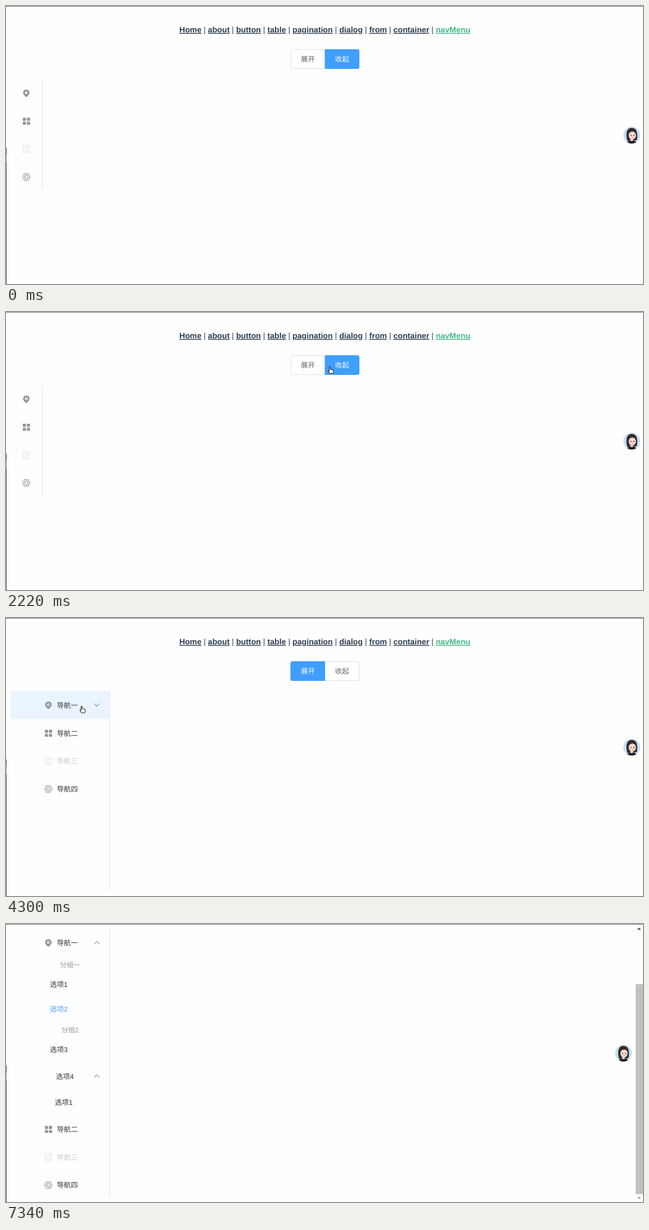
An HTML page for the animation above (7.59 s loop, 1132 px wide and 495 px high).

```html
<!DOCTYPE html>
<html lang="zh">
<head>
<meta charset="utf-8">
<title>navMenu</title>
<style>
html, body { margin: 0; width: 100%; height: 100%; overflow: hidden; background: #fefefe; }
svg { display: block; }
text { font: 12.4px 'Liberation Sans', 'Noto Sans CJK SC', 'Noto Sans CJK', sans-serif; fill: #303133; text-rendering: geometricPrecision; white-space: pre; }
.nav { font-size: 14.16px; fill: #2c3e50; text-anchor: middle; }
.nav tspan { font-weight: bold; text-decoration: underline; }
.nav .here { fill: #42b983; }
.group { font-size: 12px; fill: #909399; }
.btn { text-anchor: middle; }
.off { opacity: .25; }
.hover { fill: #eaf4ff; }
.line { fill: none; stroke: #909399; stroke-width: 1.1; stroke-linejoin: round; stroke-linecap: round; }
.cursor { fill: #fff; stroke: #222; stroke-width: 1.1; stroke-linejoin: round; }
</style>
</head>
<body>
<svg id="stage" width="1132" height="495" viewBox="0 0 1132 495">
  <defs><path id="chev" class="line" d="M-4.3 2.2L0-2.2L4.3 2.2"/></defs>
  <rect width="1132" height="495" fill="#fefefe"/>

  <g id="page">
    <g id="head">
      <text class="nav" x="566.5" y="47"><tspan>Home</tspan> | <tspan>about</tspan> | <tspan>button</tspan> | <tspan>table</tspan> | <tspan>pagination</tspan> | <tspan>dialog</tspan> | <tspan>from</tspan> | <tspan>container</tspan> | <tspan class="here">navMenu</tspan></text>
      <rect x="506" y="77.5" width="121.5" height="34" rx="3.5" fill="#fff" stroke="#dcdfe6"/>
      <path id="fillL" fill="#409eff" d="M567 77H509.5a4 4 0 0 0-4 4V108a4 4 0 0 0 4 4H567Z"/>
      <path id="fillR" fill="#409eff" d="M566.5 77H624a4 4 0 0 1 4 4V108a4 4 0 0 1-4 4H566.5Z"/>
      <text id="txtL" class="btn" x="536.4" y="99.2">展开</text>
      <text id="txtR" class="btn" x="597.2" y="99.2">收起</text>
    </g>

    <rect id="hov1" class="hover" x="8" y="130" width="176.5" height="49.6"/>
    <g id="row1">
      <path fill="#909399" fill-rule="evenodd" d="M75.2 162.4C72.4 159.6 69.6 157.4 69.6 154.4A5.7 5.7 0 0 1 81 154.4C81 157.4 78 159.6 75.2 162.4ZM75.2 151.9a2.6 2.6 0 1 0 .01 0ZM75.2 153.3a1.2 1.2 0 1 1-.01 0Z"/>
      <text class="label" x="90.4" y="159.8">导航一</text>
    </g>
    <g id="chev1"><use id="chev1r" href="#chev"/></g>

    <svg id="sub" x="0" y="180" width="184">
      <g transform="translate(0 -180)">
        <rect id="hov2" class="hover" x="8" y="251.7" width="176.5" height="44.3"/>
        <rect id="hov3" class="hover" x="8" y="323.7" width="176.5" height="44.3"/>
        <text class="group" x="96" y="198.4">分组一</text>
        <text x="78" y="234">选项1</text>
        <text id="opt2" x="78" y="278.2">选项2</text>
        <text class="group" x="98.4" y="314.6">分组2</text>
        <text id="opt3" x="78" y="350.2">选项3</text>
        <text x="88.8" y="397.8">选项4</text>
        <use href="#chev" x="161.5" y="392.5"/>
        <text id="opt41" x="86.8" y="444">选项1</text>
      </g>
    </svg>

    <g id="rest">
      <path fill="#909399" d="M69.2 199h5.4v5.4h-5.4zM76.4 199h5.4v5.4h-5.4zM69.2 206.2h5.4v5.4h-5.4zM76.4 206.2h5.4v5.4h-5.4z"/>
      <text class="label" x="90.4" y="209.6">导航二</text>
      <g class="off">
        <path class="line" d="M70 248.5H77.5L81 252V261.5H70ZM77.5 248.5V252H81M72.5 252.5H74.5M72.5 255.5H78.5M72.5 258.5H78.5"/>
        <text class="label" x="90.4" y="259">导航三</text>
      </g>
      <path id="gear" class="line"/>
      <circle class="line" cx="75.3" cy="304.4" r="2.9"/>
      <text class="label" x="90.4" y="308.6">导航四</text>
    </g>
    <rect id="edge" y="130" width="1" fill="#e6e6e6"/>
    <rect id="caret" width="1.2" height="14"/>
  </g>

  <g id="avatar">
    <circle cx="1112" cy="230" r="15" fill="#c4e0fb"/>
    <path fill="#3a2b2b" d="M1104 240C1101 229 1102 217 1112 217C1122 217 1123 229 1121 239Z"/>
    <path fill="#202024" d="M1104 242.5Q1106 239 1112 239Q1118 239 1120 242.5Q1112 247.5 1104 242.5Z"/>
    <path fill="#f6cfc0" d="M1109.5 236h5v3.5q-2.5 2.5-5 0z"/>
    <ellipse cx="1113" cy="230.5" rx="6.5" ry="7" fill="#fbdccf"/>
    <path fill="#3a2b2b" d="M1105.5 231Q1107 222 1114 221.5Q1119 223 1120 230Q1122 219 1112 217.5Q1103 219 1105.5 231Z"/>
    <circle cx="1110.4" cy="230.5" r="1.1" fill="#33262a"/><circle cx="1116" cy="230.5" r="1.1" fill="#33262a"/>
    <path d="M1112 234.6h2.6" stroke="#d0605c"/>
  </g>

  <g id="bar">
    <rect x="1118" y="1" width="14" height="494" fill="#fefefe"/>
    <rect id="patch" x="1119" y="417" width="13" height="43" fill="#f1f1f1"/>
    <rect id="thumb" x="1119" width="13" fill="#c1c1c1"/>
    <path id="up" d="M1121.5 10.2h7l-3.5-4z"/>
    <path id="down" d="M1121.5 486.2h7l-3.5 4z"/>
  </g>

  <rect width="1132" height="1" fill="#77777c"/>
  <rect y="252" width="1" height="243" fill="#4c4c50"/>
  <rect y="265" width="1" height="13" fill="#99999c"/>

  <path id="arrow" class="cursor" d="M-3.6-5.6V4.6Q-3.4 6-2.2 5.2L.2 3.2H3.6Q5 2.8 4 1.6L-2.4-5.6Q-3.2-6.4-3.6-5.6Z"/>
  <path id="hand" class="cursor" d="M-2.6 1V-5Q-1.6-6.8-.6-5V-1.4Q.6-2.2 1.4-1Q2.6-1.6 3.2-.4Q4.8-.8 4.8 1V3Q4.6 4.6 3.6 6H-1.6Q-3 3.6-4.6 1.6Q-4.6 0-2.6 1Z"/>
</svg>

<script>
const LOOP = 7590, SUB = 282.2, MAX_SCROLL = 121.7;
const BLUE = '#409eff', DARK = '#303133', GREY = '#606266';
const $ = id => document.getElementById(id);
const set = (id, attrs) => { for (const k in attrs) $(id).setAttribute(k, attrs[k]); };
const show = (id, on) => set(id, { opacity: +on });
const move = (id, x, y) => set(id, { transform: `translate(${x} ${y})` });
const ramp = (t, a, b) => Math.min(1, Math.max(0, (t - a) / (b - a)));
const ease = (t, a, b) => { const p = ramp(t, a, b); return p * p * (3 - 2 * p); };
const within = (t, ...spans) => spans.some(([a, b]) => t >= a && t < b);

// time, x, y
const path = [
  [160, 710, 44], [810, 541, 105], [1250, 541, 105], [1700, 607, 105], [2050, 607, 105],
  [2400, 545, 102], [2520, 545, 102], [2880, 208.5, 160], [3130, 150, 165], [3470, 150, 165],
  [3700, 136, 163], [4640, 136, 163], [4870, 150, 183], [5010, 144, 216], [5390, 121, 236],
  [5600, 121, 236], [5920, 105, 160], [6300, 105, 160], [6750, 804, 40], [6890, 770, 14], [7060, 764, -14]
];

function pointer(t) {
  const i = path.findIndex(p => p[0] > t);
  if (i < 1) return [-40, -40];
  const [a, x, y] = path[i - 1], [b, x2, y2] = path[i], p = ease(t, a, b);
  return [x + (x2 - x) * p, y + (y2 - y) * p];
}

let gear = '';
for (let i = 0; i < 48; i++) {
  const a = i * Math.PI / 24, r = 6 + .7 * Math.cos(6 * a);
  gear += (i ? 'L' : 'M') + (75.3 + r * Math.cos(a)).toFixed(2) + ' ' + (304.4 + r * Math.sin(a)).toFixed(2);
}
set('gear', { d: gear + 'Z' });

function buttons(t, open) {
  const fill = ramp(t, 1090, 1210) - ramp(t, 1920, 2040) + ramp(t, 2500, 2620);
  show('fillL', 0); show('fillR', 0);
  set('fillL', { opacity: fill });
  set('fillR', { opacity: 1 - fill });
  set('txtL', { style: 'fill:' + (open ? '#fff' : within(t, [640, 1090], [2330, 2500]) ? BLUE : GREY) });
  set('txtR', { style: 'fill:' + (!open ? '#fff' : within(t, [1480, 1920]) ? BLUE : GREY) });
}

function menu(t, open, sub) {
  const wide = ease(t, 1090, 1390) - ease(t, 1920, 2220) + ease(t, 2500, 2800);
  const turn = 1 - ease(t, 3600, 3880) + ease(t, 4380, 4620);
  const edge = 64 + 120 * wide, dx = -39.2 * (1 - wide);
  move('row1', dx, 0);
  move('rest', dx, SUB * sub);
  document.querySelectorAll('.label').forEach(e => e.setAttribute('opacity', wide));
  move('chev1', edge - 22.5, 154.8);
  show('chev1', wide);
  set('chev1r', { transform: `rotate(${180 * (1 - turn)})` });
  set('sub', { width: edge, height: Math.max(0, SUB * sub), opacity: wide });
  const bottom = 328 + SUB * sub;
  set('edge', { x: edge, height: (open ? Math.max(484, bottom) : bottom) - 130 });

  set('hov1', { opacity: ramp(t, 3040, 3200) - ramp(t, 4680, 4800) });
  set('hov3', { opacity: ramp(t, 4930, 5010) - ramp(t, 6140, 6300) });
  set('hov2', { opacity: t < 7340 ? ramp(t, 6140, 6300) : 0 });
  const paint = (id, on) => set(id, { style: 'fill:' + (on ? BLUE : DARK) });
  paint('opt41', t < 5570);
  paint('opt3', within(t, [5570, 6140]));
  paint('opt2', t >= 6140);

  const picked = t >= 5570;
  set('caret', {
    x: picked ? 109.4 : 127.4,
    y: t >= 6140 ? 267 : picked ? 339 : 148.5,
    fill: picked ? BLUE : DARK,
    opacity: +within(t, [3600, 4100], [4380, 4960], [5300, 7000])
  });
}

function draw(t) {
  const open = within(t, [1090, 1920], [2500, LOOP]);
  const sub = ease(t, 1390, 1690) - ease(t, 1920, 2080) + ease(t, 2800, 3100)
    - ease(t, 3600, 3880) + ease(t, 4380, 4660);
  const scroll = MAX_SCROLL * (1 - (1 - ramp(t, 4660, 5010)) ** 3);
  const tall = 334.5 + SUB * sub, bar = tall > 495;

  buttons(t, open);
  menu(t, open, sub);
  move('page', 0, -scroll);
  move('head', bar ? -7.4 : 0, 0);
  move('avatar', bar ? -14.7 : 0, 0);

  show('bar', bar);
  show('patch', within(t, [1640, 1920]));
  set('thumb', { y: 15 + 466 * scroll / tall, height: 466 * Math.min(1, 495 / tall) });
  set('up', { fill: scroll > 0 ? '#505050' : '#a3a3a3' });
  set('down', { fill: scroll > MAX_SCROLL - .5 ? '#a3a3a3' : '#505050' });

  const [x, y] = pointer(t);
  const arrow = within(t, [0, 620], [2600, 3040], [4680, 4930], [6330, LOOP]);
  move('arrow', x, y);
  move('hand', x, y);
  show('arrow', arrow);
  show('hand', !arrow);
}

function tick() {
  draw(performance.now() % LOOP);
  requestAnimationFrame(tick);
}
tick();
</script>
</body>
</html>
```
